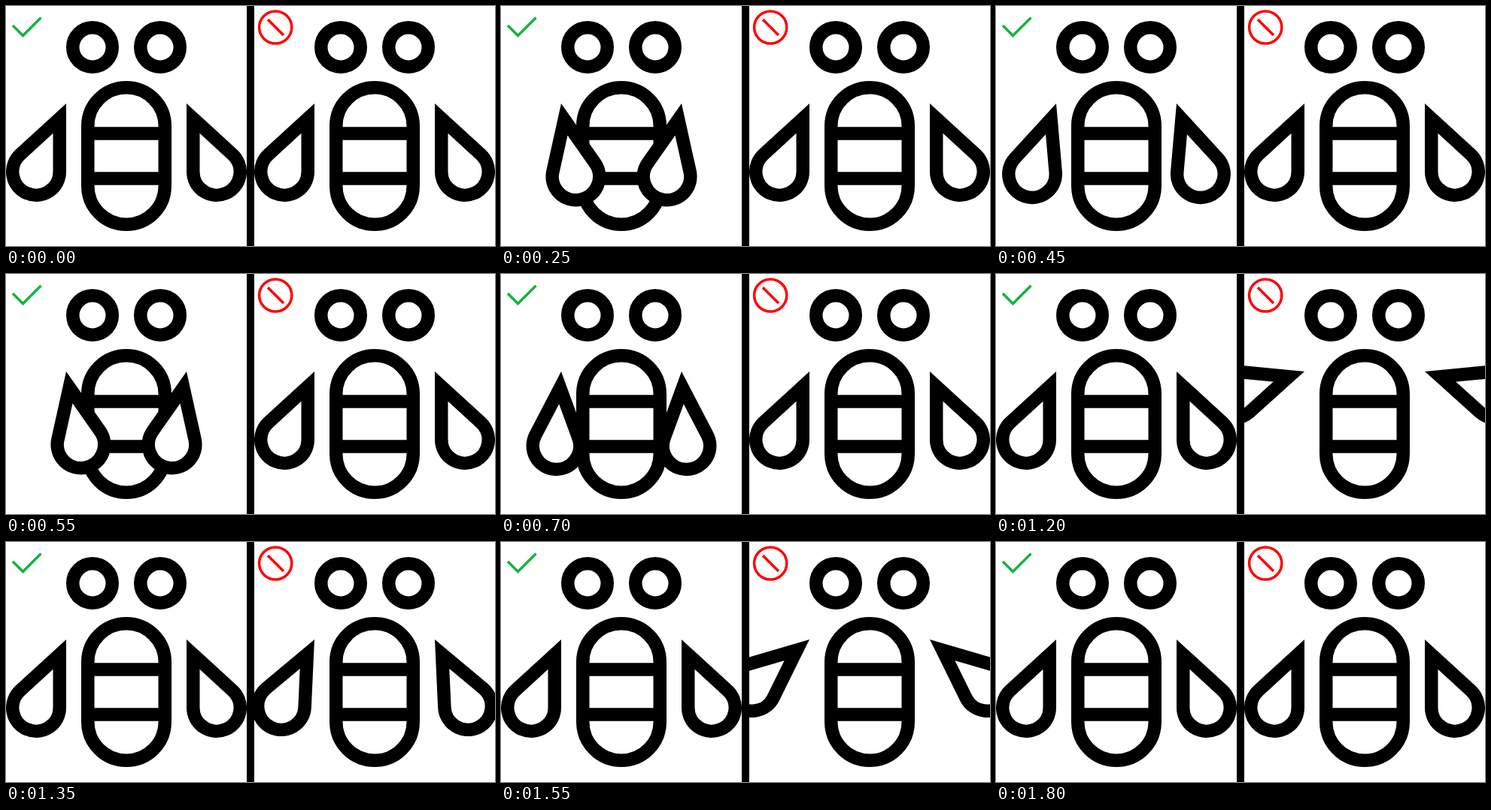
These frames come from a looping animation (650 by 320 pixels, 2.3 s). An HTML page:

```html
<!DOCTYPE html>
<html lang="en">
<head>
<meta charset="utf-8">
<title>Wing flap comparison</title>
<style>
  html, body { margin: 0; width: 100%; height: 100%; overflow: hidden; background: #fff; }
  svg { display: block; }
</style>
</head>
<body>
<svg width="650" height="320" viewBox="0 0 650 320">
  <defs>
    <clipPath id="panel"><rect width="320" height="320"/></clipPath>
    <g id="bee" fill="#fff" stroke="#000" stroke-width="17.5">
      <circle cx="115" cy="55" r="26.25"/>
      <circle cx="205" cy="55" r="26.25"/>
      <rect x="108.75" y="108.75" width="102.5" height="182.5" rx="51.25"/>
      <path d="M108.75 170H211.25M108.75 230H211.25"/>
    </g>
    <!-- drop shape hanging from its tip at 0,0 -->
    <path id="wing" d="M-8.75 19.9V91A31.25 31.25 0 1 1 -61.13 67.97Z"
      fill="#fff" stroke="#000" stroke-width="17.5" stroke-miterlimit="6"/>
  </defs>
  <rect width="650" height="320" fill="#fff"/>
  <g clip-path="url(#panel)">
    <use href="#bee"/>
    <use href="#wing" class="good" data-place="translate(80 130)"/>
    <use href="#wing" class="good" data-place="translate(240 130) scale(-1 1)"/>
  </g>
  <g transform="translate(330 0)" clip-path="url(#panel)">
    <use href="#bee"/>
    <use href="#wing" class="bad" data-place="translate(80 130)"/>
    <use href="#wing" class="bad" data-place="translate(240 130) scale(-1 1)"/>
  </g>
  <rect x="320" width="10" height="320"/>
  <path d="M9 26L22.5 39.5L46.5 15.5" fill="none" stroke="#14b43c" stroke-width="3.5"/>
  <g fill="none" stroke="#f00" stroke-width="3.5">
    <circle cx="358.2" cy="28.5" r="21.6"/>
    <path d="M348 18L369 39"/>
  </g>
</svg>
<script>
  const LOOP = 2300, STEP = 50, FLAP = 400, FLAPS = 2;
  const INWARD = -40, OUTWARD = 48;

  const easeInOut = p => p < 0.5 ? 2 * p * p : 1 - 2 * (1 - p) ** 2;
  const easeIn = p => p ** 2.1;

  // Out and back, twice, starting at the given time.
  function flap(time, start, ease) {
    const t = time - start;
    if (t <= 0 || t >= FLAP * FLAPS) return 0;
    const phase = (t % FLAP) / FLAP;
    return ease(1 - Math.abs(1 - 2 * phase));
  }

  function turn(name, angle) {
    for (const wing of document.querySelectorAll(name))
      wing.setAttribute("transform", `${wing.dataset.place} rotate(${angle})`);
  }

  function draw(ms) {
    const time = Math.floor((ms % LOOP) / STEP) * STEP;
    turn(".good", INWARD * flap(time, 0, easeInOut));
    turn(".bad", OUTWARD * flap(time, 1000, easeIn));
  }

  let origin;
  function tick(now) {
    origin ??= now;
    draw(now - origin);
    requestAnimationFrame(tick);
  }
  draw(0);
  requestAnimationFrame(tick);
</script>
</body>
</html>
```
